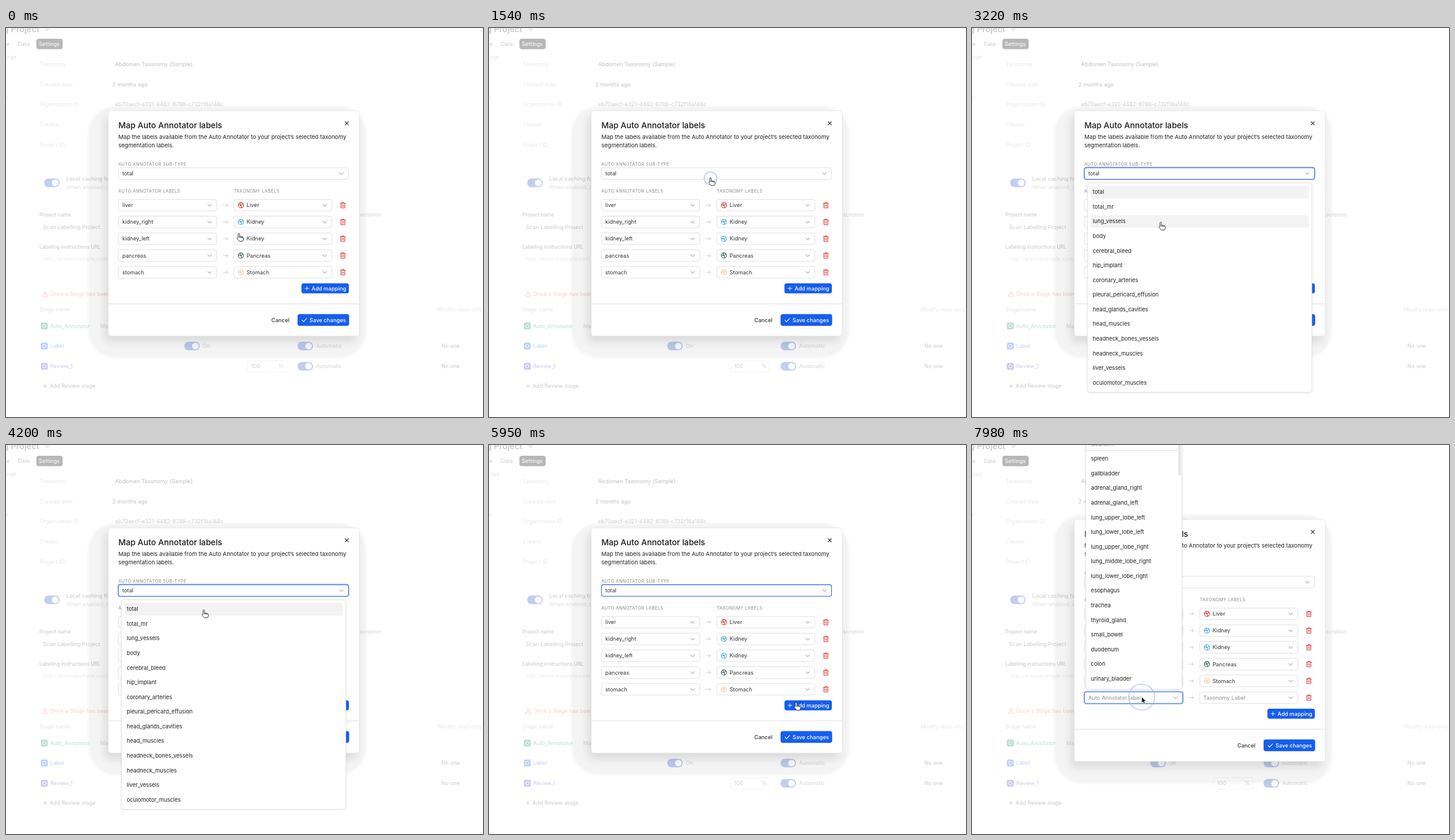
These frames come from a looping animation (800 by 652 pixels, 8 s). An HTML page:

```html
<!DOCTYPE html>
<html lang="en">
<head>
<meta charset="utf-8">
<title>Label mapping</title>
<style>
  html, body { margin: 0; width: 100%; height: 100%; overflow: hidden; background: #fff; }
  svg { display: block; width: 100%; height: 100%; font: 9.14px Inter, "Liberation Sans", sans-serif; }
  .caps { font-size: 7.03px; letter-spacing: .55px; fill: #858585; }
  .field { fill: #fff; stroke: #dadada; stroke-width: .8; }
  .line { fill: none; stroke-linecap: round; stroke-linejoin: round; }
  .panel { fill: #fff; stroke: #dcdcdc; stroke-width: .8; filter: drop-shadow(0 1px 2px rgba(0,0,0,.08)); }
  .glow { fill: none; stroke: #d3e0fc; stroke-width: 1.6; }
  .focus { fill: none; stroke: #2f6bea; stroke-width: 1.1; }
  .menu { font-size: 9.28px; }
  #page { opacity: .85; }
  #halo { fill: #000; opacity: .045; filter: blur(2px); }
  #box { fill: #fff; stroke: #e4e4e4; stroke-width: .8; filter: drop-shadow(-5px 9px 8px rgba(0,0,0,.11)); }
</style>
</head>
<body>
<svg viewBox="0 0 800 652" xmlns="http://www.w3.org/2000/svg">
  <g id="page"></g>
  <g id="modal">
    <rect id="halo" x="138" y="131" width="466" rx="46"/>
    <rect id="box" x="171.5" y="138.8" width="421" rx="4"/>
    <g id="head"></g>
    <g id="rows"></g>
    <g id="foot"></g>
  </g>
  <g id="typeMenu" class="menu"></g>
  <g id="labelMenu" class="menu"></g>
  <circle id="ripple" fill="none" stroke="#9db9f2" stroke-width="1.1"/>
  <g id="pointer">
    <path id="arrow" d="M0 0V10.5L2.4 8.3 4 12 5.8 11.2 4.2 7.6H7.4Z" fill="#111" stroke="#fff" stroke-width=".7"/>
    <g id="hand" stroke="#222" stroke-width=".9" stroke-linejoin="round">
      <path fill="#fff" d="M-1.2 6.8V.6a1.2 1.2 0 0 1 2.4 0V4.6l5 1.1c1.1.3 1.7 1 1.6 2.1l-.6 3.2-1 1.6H1.2L-2.8 8.2c-.8-1.1.5-2 1.6-1.4z"/>
      <path fill="none" d="M1.2 4.6V7M3.4 5V7.2M5.5 5.5V7.4"/>
    </g>
  </g>
</svg>
<script>
const $ = id => document.getElementById(id);
const BLUE = '#155eef';
const PITCH = 24.58, ROW = 28.1, ROW_TOP = 297;

const text = (x, y, s, fill = '#333', extra = '') =>
  `<text x="${x}" y="${y}" fill="${fill}" ${extra}>${s}</text>`;
const caps = (x, y, s) => `<text class="caps" x="${x}" y="${y}">${s}</text>`;
const rect = (x, y, w, h, rx, fill, extra = '') =>
  `<rect x="${x}" y="${y}" width="${w}" height="${h}" rx="${rx}" fill="${fill}" ${extra}/>`;
const line = (x, y, d, color, width = .9) =>
  `<path class="line" transform="translate(${x} ${y})" d="${d}" stroke="${color}" stroke-width="${width}"/>`;
const medium = 'font-weight="500"';

const field = (x, y, w) =>
  `<rect class="field" x="${x}" y="${y - 9.7}" width="${w}" height="19.4" rx="3.5"/>` +
  line(x + w - 12, y + .3, 'M-3-1.4 0 1.4 3-1.4', '#777');
const glow = (x, y, w, id) =>
  rect(x - 1.2, y - 10.9, w + 2.4, 21.8, 4.7, 'none', `class="glow" id="${id}Glow"`);
const focus = (x, y, w, id) =>
  rect(x, y - 9.7, w, 19.4, 3.5, 'none', `class="focus" id="${id}Focus"`);
const toggle = (x, y) =>
  rect(x, y - 7.3, 26, 14.6, 7.3, '#b6c6ef') + `<circle cx="${x + 18.5}" cy="${y}" r="5.6" fill="#fff"/>`;
const organ = (y, color) => line(394, y,
  'M4.4 0A4.4 4.4 0 1 1-4.4 0 4.4 4.4 0 1 1 4.4 0M-4.2-.8 0 .4 3.4-2.6M0 .4 1.8 3.8M0 .4-1.6-3.8', color, 1.1);
const trash = y => line(565, y,
  'M-4.2-3.2H4.2M-1.5-3.2V-4.7H1.5V-3.2M-3.3-3.2V4.5H3.3V-3.2M-1.1-.8V2.3M1.1-.8V2.3', '#d7392f', 1);

function mapping(i, from, to, color) {
  const y = ROW_TOP + ROW * i, base = y + 3.2;
  return field(188.5, y, 165) + text(195, base, from, color ? '#333' : '#8f8f8f') +
    line(368, y, 'M-3.8 0H3.8M1.2-2.4 3.8 0 1.2 2.4', '#c9c9c9') +
    field(382, y, 164.5) + (color ? organ(y, color) : '') +
    text(color ? 403.5 : 388, base, to, color ? '#333' : '#8f8f8f') + trash(y);
}

function stage(y, name, color) {
  return rect(58.5, y - 5.7, 11.4, 11.4, 2.5, color) +
    `<circle cx="64.2" cy="${y}" r="2.8" fill="none" stroke="#fff"/>` + text(74, y + 3.2, name, color);
}

// Page behind the dialog
$('page').innerHTML =
  text(56, 6.5, 'g Project', '#c2c2c2', 'font-size="14" font-weight="600" text-anchor="end"') +
  line(66, 2, 'M0-2H7M0 0.4H7M2 2.6H5', '#d0d0d0') +
  text(6, 30, 'e', '#c4c4c4', 'text-anchor="end"') + text(20, 30, 'Data', '#c4c4c4') +
  rect(51, 18, 44, 17.4, 4, '#ababab') + text(55, 30, 'Settings', '#fff') +
  text(17, 52, 'script', '#dedede', 'text-anchor="end"') + text(0, 120, 'r', '#e0e0e0') +
  ['Taxonomy', 'Created date', 'Organization ID', 'Creator', 'Project ID']
    .map((s, i) => text(56.5, 64 + i * 33.7, s, '#e2e2e2')).join('') +
  text(183, 64, 'Abdomen Taxonomy (Sample)', '#b4b4b4') +
  text(178.5, 98, '2 months ago', '#b4b4b4') +
  text(183, 131, 'eb70aecf-e321-4482-8788-c732f16a148c', '#c6c6c6') +
  toggle(64, 259.5) + text(101, 256, 'Local caching for faster loading', '#c8c8c8', medium) +
  text(101, 270, 'When enabled, data is kept locally', '#dcdcdc') +
  text(56, 316, 'Project name', '#c6c6c6', medium + ' font-size="8.44"') +
  text(629, 316, 'Description', '#d2d2d2', medium + ' font-size="8.44" text-anchor="end"') +
  text(62, 337, 'Scan Labelling Project', '#c2c2c2') +
  text(56, 369.5, 'Labeling instructions URL', '#c6c6c6', medium + ' font-size="8.44"') +
  text(62, 390, 'http://www.example.com', '#e6e6e6') +
  line(65.7, 446, 'M0-4 4.4 3.6H-4.4ZM0-1.2V1', '#f2c4be') +
  text(74, 449, 'Once a Stage has been added', '#f2c9c3') +
  text(56, 474.5, 'Stage name', '#dedede') + text(724, 474.5, 'Modify read-only', '#e4e4e4') +
  stage(499.5, 'Auto_Annotator', '#b4d8c6') + text(158, 503, 'Manual', '#d2d2d2') +
  stage(533, 'Label', '#b4c9f2') + stage(567, 'Review_1', '#cbbdf0') +
  toggle(299, 533) + text(330, 536.3, 'On', '#cccccc') +
  [533, 567].map(y => toggle(489, y) + text(520, y + 3.3, 'Automatic', '#cccccc') +
    text(730, y + 3.3, 'No one', '#c0c0c0')).join('') +
  rect(405, 557.5, 66, 19.5, 3, 'none', 'stroke="#f3f3f3"') +
  text(411, 570.3, '100', '#c6c6c6') + text(457, 570.3, '%', '#cccccc') +
  line(65.5, 600.2, 'M-3 0H3M0-3V3', '#c8c8c8') + text(73, 603.4, 'Add Review stage', '#c0c0c0');

// Dialog
$('head').innerHTML =
  text(188.5, 168, 'Map Auto Annotator labels', '#1a1a1a', medium + ' font-size="13.7"') +
  line(571.5, 159.7, 'M-2.7-2.7 2.7 2.7M2.7-2.7-2.7 2.7', '#333', 1.1) +
  text(188.5, 186, 'Map the labels available from the Auto Annotator to your project’s selected taxonomy', '#222', 'font-size="9.54"') +
  text(188.5, 200.2, 'segmentation labels.', '#222', 'font-size="9.54"') +
  caps(188.5, 231, 'AUTO ANNOTATOR SUB-TYPE') + caps(188.5, 276, 'AUTO ANNOTATOR LABELS') +
  caps(382, 276, 'TAXONOMY LABELS') + field(188.5, 243.8, 386) + text(195, 247, 'total') +
  glow(188.5, 243.8, 386, 'type') + focus(188.5, 243.8, 386, 'type');

$('rows').innerHTML = [
  ['liver', 'Liver', '#dc3a2e'], ['kidney_right', 'Kidney', '#41abe0'], ['kidney_left', 'Kidney', '#41abe0'],
  ['pancreas', 'Pancreas', '#3c5f56'], ['stomach', 'Stomach', '#f6c8a2']
].map((r, i) => mapping(i, ...r)).join('') +
  `<g id="newRow">${mapping(5, 'Auto Annotator label', 'Taxonomy Label')}</g>`;

$('foot').innerHTML =
  rect(495.5, 428, 79.5, 16.7, 3.5, BLUE) + line(504.7, 436.4, 'M-3.2 0H3.2M0-3.2V3.2', '#fff') +
  text(512.5, 439.5, 'Add mapping', '#fff', medium) +
  '<path d="M172 462.3H592" stroke="#dcdcdc" stroke-width=".9"/>' +
  text(445, 492.5, 'Cancel', '#333', medium) + rect(489, 479.6, 86.5, 19.7, 4, BLUE) +
  line(500.3, 489.5, 'M-3.8 .2-1.2 2.8 3.8-2.6', '#fff', 1.1) + text(509, 492.7, 'Save changes', '#fff', medium);

// Menus
const list = (x, y, names) => names.split(' ').map((s, i) => text(x, y + i * PITCH, s, '#222')).join('');
$('typeMenu').innerHTML =
  '<rect class="panel" x="193.7" y="259.5" width="376.3" height="351" rx="4"/>' +
  rect(199, 264.6, 366, 21, 3, '#f3f3f3') + rect(199, 264.6, 366, 21, 3, '#f3f3f3', 'id="hover"') +
  list(202.5, 278.2, 'total total_mr lung_vessels body cerebral_bleed hip_implant coronary_arteries ' +
    'pleural_pericard_effusion head_glands_cavities head_muscles headneck_bones_vessels ' +
    'headneck_muscles liver_vessels oculomotor_muscles');
$('labelMenu').innerHTML =
  '<rect class="panel" x="191" y="-20" width="161" height="429.5" rx="4"/>' +
  text(200, 2.2, 'Search...', '#9a9a9a') + '<path d="M191 9.3H345" stroke="#dedede" stroke-width=".9"/>' +
  rect(346, -10, 4.4, 61, 2.2, '#e6e6e6') +
  list(199.5, 26.2, 'spleen gallbladder adrenal_gland_right adrenal_gland_left lung_upper_lobe_left ' +
    'lung_lower_lobe_left lung_upper_lobe_right lung_middle_lobe_right lung_lower_lobe_right esophagus ' +
    'trachea thyroid_gland small_bowel duodenum colon urinary_bladder') +
  glow(188.5, 423.5, 165, 'label') + focus(188.5, 423.5, 165, 'label');

// Timeline
const LOOP = 8000, STEP = 70, RIPPLE = 350;
const path = [ // time, x, y
  [0, 390.5, 345], [280, 389, 344], [420, 389, 344], [1260, 373.5, 249.5], [1470, 371.5, 251.5],
  [2100, 371.5, 251.5], [2590, 317.5, 330], [3080, 317.5, 329], [3220, 316.5, 326], [3990, 331, 278],
  [4130, 331, 278], [4270, 332.5, 276], [4760, 332.5, 276], [6020, 515, 432], [6860, 515, 432],
  [6930, 507, 421], [7630, 284.5, 422], [LOOP, 284.5, 422]
];
const clicks = [1540, 4410, 6090, 7770];
const ease = p => p < .5 ? 4 * p ** 3 : 1 - 4 * (1 - p) ** 3;
const show = (id, on) => $(id).style.display = on ? '' : 'none';

function pointerAt(t) {
  const i = path.findIndex((k, n) => n && t < k[0]);
  const [t0, x0, y0] = path[i - 1], [t1, x1, y1] = path[i];
  const p = ease((t - t0) / (t1 - t0));
  return [x0 + (x1 - x0) * p, y0 + (y1 - y0) * p];
}

function isClickable(x, y, grown) {
  const my = grown ? y + 14 : y, fy = grown ? my - 28 : my;
  const within = (v, a, b) => v >= a && v <= b;
  if (within(x, 188, 575) && within(my, 234, 254)) return true;
  if (within(x, 495, 575) && within(fy, 428, 445)) return true;
  const row = Math.round((my - ROW_TOP) / ROW);
  return within(row, 0, grown ? 5 : 4) && Math.abs(my - ROW_TOP - row * ROW) < 9.8 &&
    (within(x, 188, 354) || within(x, 382, 547) || within(x, 560, 570));
}

function draw(t) {
  const typeOpen = t >= 1680 && t < 4550, labelOpen = t >= 7840, grown = t >= 6230;
  const [x, y] = pointerAt(t);

  $('modal').setAttribute('transform', `translate(0 ${grown ? -14 : 0})`);
  $('foot').setAttribute('transform', `translate(0 ${grown ? 28 : 0})`);
  $('box').setAttribute('height', grown ? 405.5 : 377.5);
  $('halo').setAttribute('height', grown ? 450 : 422);
  show('newRow', grown);
  show('typeMenu', typeOpen);
  show('labelMenu', labelOpen);
  show('typeGlow', typeOpen);
  show('typeFocus', t >= 1610 && t < 6160);

  const item = Math.floor((y - 262.7) / PITCH), onItem = typeOpen && item >= 0;
  show('hover', onItem);
  $('hover').setAttribute('y', 264.6 + item * PITCH);

  const hand = typeOpen ? onItem : !labelOpen && isClickable(x, y, grown);
  show('hand', hand);
  show('arrow', !hand);
  $('pointer').setAttribute('transform', `translate(${x} ${y})`);

  const click = clicks.find(c => t >= c && t < c + RIPPLE);
  show('ripple', click !== undefined);
  if (click !== undefined) {
    const p = (t - click + STEP) / RIPPLE;
    $('ripple').setAttribute('cx', x);
    $('ripple').setAttribute('cy', y + .5);
    $('ripple').setAttribute('r', 21.7 * (1 - (1 - p) ** 3) + .2);
    $('ripple').setAttribute('opacity', Math.min(1, 1.9 - p));
  }
}

const start = performance.now();
function tick() {
  const t = (performance.now() - start) % LOOP;
  draw(Math.floor(t / STEP) * STEP);
  requestAnimationFrame(tick);
}
tick();
</script>
</body>
</html>
```
